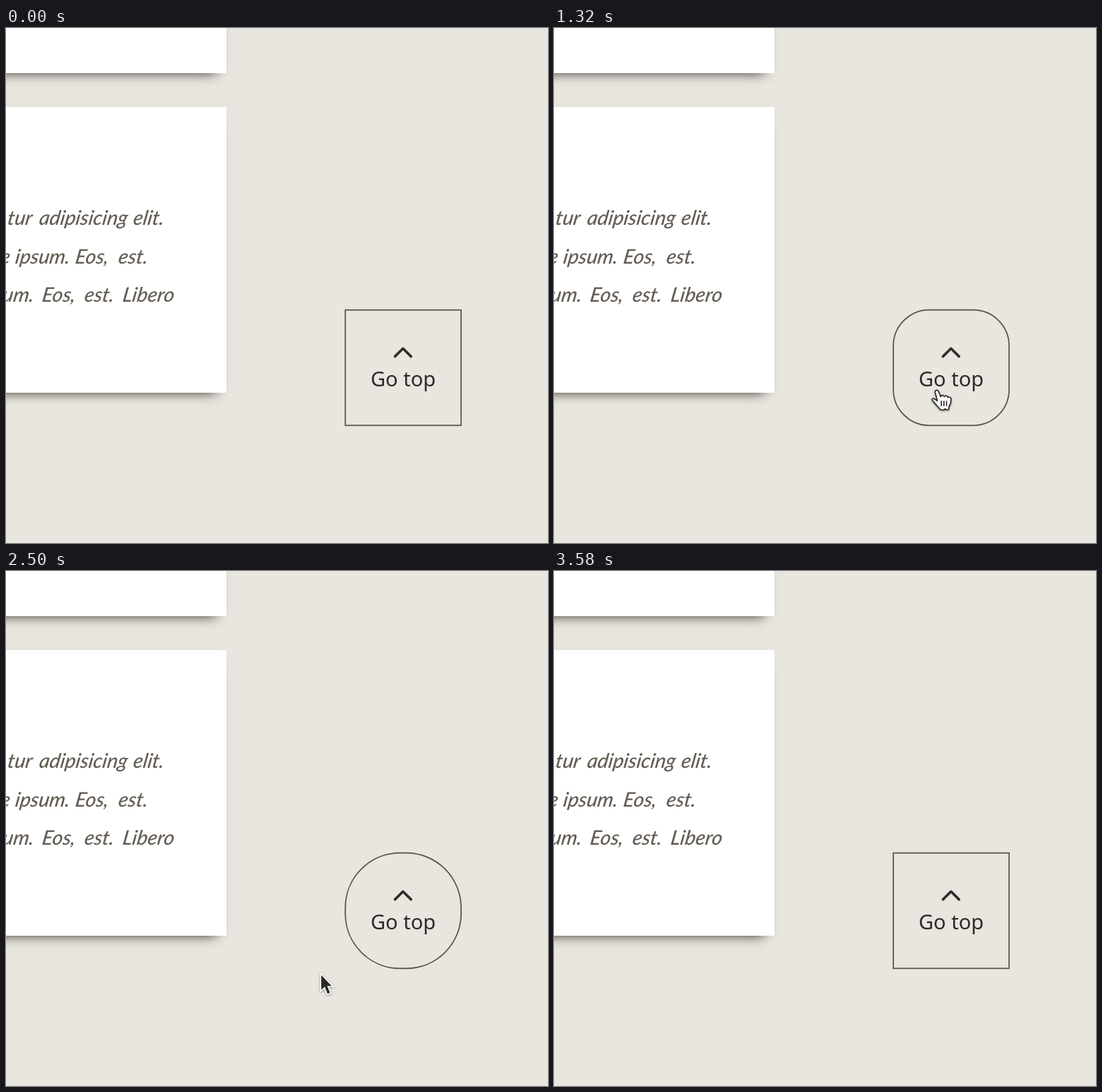
An HTML page that plays this animation: 767x730 px, repeating every 4120 ms.

```html
<!DOCTYPE html>
<html lang="en">
<head>
<meta charset="utf-8">
<title>Go top button</title>
<style>
  html, body { margin: 0; width: 100%; height: 100%; overflow: hidden; background: #e8e6df; }
  .card {
    position: absolute; left: -400px; width: 712px; background: #fff;
    box-shadow: 0 15px 16px -15px rgba(40, 30, 28, .9), 0 0 12px rgba(60, 50, 40, .03);
  }
  svg { position: absolute; left: 0; top: 0; }
  .note { font: italic 500 28.5px Caveat, Lato, sans-serif; fill: #645d54; }
  .label { font: 29px "Noto Sans", "Open Sans", sans-serif; fill: #2e292a; text-anchor: middle; }
  .cursor { filter: drop-shadow(0 1.5px 1.5px rgba(0, 0, 0, .4)); }
</style>
</head>
<body>
<div class="card" style="top:-300px;height:364px"></div>
<div class="card" style="top:112px;height:405px"></div>
<svg width="767" height="730" viewBox="0 0 767 730">
  <g class="note">
    <text transform="translate(0 279) skewX(-9)"><tspan x="1">tur </tspan><tspan x="46">adipisicing </tspan><tspan x="179">elit.</tspan></text>
    <text transform="translate(0 334) skewX(-9)"><tspan x="-9">e </tspan><tspan x="12">ipsum. </tspan><tspan x="97">Eos, </tspan><tspan x="158">est.</tspan></text>
    <text transform="translate(0 388) skewX(-9)"><tspan x="-6">um. </tspan><tspan x="50">Eos, </tspan><tspan x="110">est. </tspan><tspan x="164">Libero</tspan></text>
  </g>
  <rect id="box" x="480.2" y="399.7" width="163.8" height="163.6" fill="none" stroke="#55514e" stroke-width="1.7"/>
  <path d="M550.4 465.6L561.8 454.3L573.2 465.6" fill="none" stroke="#322d2b" stroke-width="3.6" stroke-linecap="round" stroke-linejoin="round"/>
  <text class="label" x="562" y="507.5">Go top</text>
  <g id="arrow" class="cursor">
    <path d="M1.5 2.5V23.5L6.5 19.1L10.3 29.1L13.9 27.6L9.9 17.9H16.3Z" fill="#2b2726" stroke="#fff" stroke-width="3.4" paint-order="stroke"/>
  </g>
  <g id="hand" class="cursor" stroke="#2b2726" stroke-width="1.6" stroke-linecap="round" stroke-linejoin="round">
    <path fill="#fff" d="M1.2 14L-1.6 4C-2.5 0 1.8-1 3.2 2.6L6 9.6C7.5 6.8 10.6 7.2 11.2 9.6C12.8 7.6 15.8 8 16.2 10.6C18.5 9.2 21 10.6 20.8 13.4C20.8 19 19.8 21 17.8 24L17.5 28H14L12.5 26.5L11 28.5L5.5 28C4 25 0 22-2 19C-3.5 16.6-6.5 15-6.2 13.4C-5.6 11.4-2.6 12 1.2 15.5Z"/>
    <path fill="none" d="M7 16V22.5M10.7 16V22.5M14.4 16V22.5"/>
  </g>
</svg>
<script>
  const LOOP = 4120, FADE = 600, ENTER = 1105, LEAVE = 2460, ROUND = 81.8;
  const $ = id => document.getElementById(id);
  const box = $('box'), arrow = $('arrow'), hand = $('hand');

  // Pointer tip: time, x, y
  const path = [
    [660, 203, 727], [840, 358, 595], [960, 425, 563], [1100, 486, 536],
    [1220, 529, 517], [1320, 541, 513], [1400, 542, 513], [1720, 542, 513],
    [2280, 542, 513], [2300, 540, 513], [2460, 480, 549], [2660, 273, 674], [2780, 175, 738]
  ];

  // The CSS "ease" curve, solved by bisection
  const bezier = (a, b, u) => 3 * a * u * (1 - u) ** 2 + 3 * b * u * u * (1 - u) + u ** 3;
  function ease(x) {
    if (x <= 0) return 0;
    if (x >= 1) return 1;
    let lo = 0, hi = 1;
    for (let i = 0; i < 24; i++) {
      const mid = (lo + hi) / 2;
      if (bezier(.25, .25, mid) < x) lo = mid; else hi = mid;
    }
    return bezier(.1, 1, lo);
  }

  function slope(i, k) {
    const a = path[Math.max(i - 1, 0)], b = path[Math.min(i + 1, path.length - 1)];
    return (b[k] - a[k]) / (b[0] - a[0]);
  }

  // Smooth curve through the pointer positions
  function tip(t, k) {
    const i = path.findIndex((p, n) => n && t <= path[n][0]) - 1;
    const a = path[i], b = path[i + 1], d = b[0] - a[0], u = (t - a[0]) / d;
    return a[k] * (1 + 2 * u) * (1 - u) ** 2 + slope(i, k) * d * u * (1 - u) ** 2
      + b[k] * u * u * (3 - 2 * u) - slope(i + 1, k) * d * u * u * (1 - u);
  }

  function draw() {
    const t = performance.now() % LOOP;
    const visible = t >= path[0][0] && t <= path[path.length - 1][0];
    const hover = t >= ENTER && t < LEAVE;
    box.setAttribute('rx', ROUND * (ease((t - ENTER) / FADE) - ease((t - LEAVE) / FADE)));
    arrow.style.display = visible && !hover ? '' : 'none';
    hand.style.display = visible && hover ? '' : 'none';
    if (visible) {
      const move = `translate(${tip(t, 1)} ${tip(t, 2)})`;
      arrow.setAttribute('transform', move);
      hand.setAttribute('transform', move);
    }
    requestAnimationFrame(draw);
  }
  draw();
</script>
</body>
</html>
```
